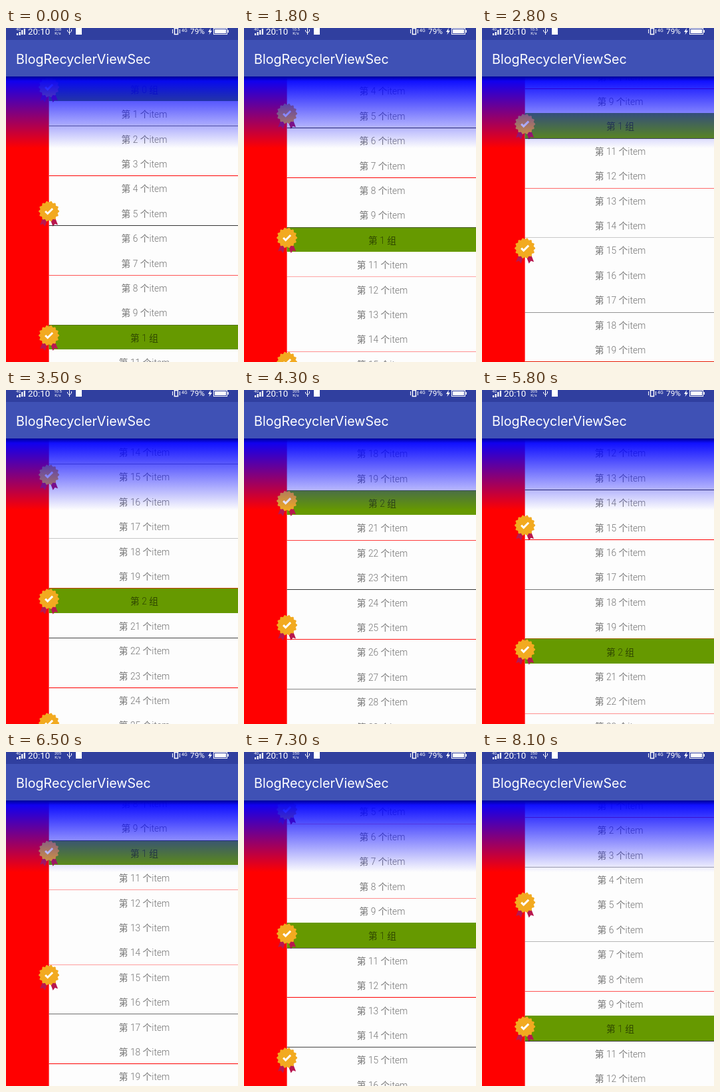
An HTML page with a canvas that plays this animation: 349x503 px, repeating every 8.5 s.

```html
<!DOCTYPE html>
<html lang="zh-CN">
<head>
<meta charset="utf-8">
<title>BlogRecyclerViewSec</title>
<style>
  html, body { margin: 0; width: 100%; height: 100%; overflow: hidden; background: #fdfdfd; }
  canvas { display: block; }
</style>
</head>
<body>
<canvas id="stage" width="349" height="503"></canvas>
<script>
const W = 349, H = 503, LOOP = 8500, STEP = 100;
const TOP = 73, SIDE = 64.6, ROW = 37.4;
const ctx = document.getElementById('stage').getContext('2d');

const SANS = 'Roboto, "Noto Sans CJK SC", "Noto Sans CJK", sans-serif';

// Scroll track: [time, offset, easing towards this key]
const easeIn = p => u => u ** p;
const easeOut = p => u => 1 - (1 - u) ** p;
const linear = u => u;
const track = [
  [0, 0, linear],
  [1200, 0, linear],
  [1800, 147.04, easeIn(1.3)],
  [2500, 300, easeOut(1.6)],
  [2700, 300, linear],
  [3500, 522.37, easeIn(1.2)],
  [4800, 695.5, easeOut(2)],
  [4900, 695.5, linear],
  [5000, 692.55, linear],
  [5800, 446.2, linear],
  [7300, 189.42, easeOut(1.15)],
  [8100, 49.39, easeOut(1.4)],
  [LOOP, 49.39, linear]
];

// Network speed shown in the status bar: [from, value]
const speeds = [[0, '328'], [1600, '10.5'], [4000, '205'], [7000, '250']];

function scrollAt(t) {
  const i = track.findIndex(k => k[0] > t);
  const [t0, a] = track[i - 1], [t1, b, ease] = track[i];
  return a + (b - a) * ease((t - t0) / (t1 - t0));
}

function rect(color, x, y, w, h) {
  ctx.fillStyle = color;
  ctx.fillRect(x, y, w, h);
}

function text(str, x, y, size, { color = '#fff', align = 'left', font = SANS, weight = 400 } = {}) {
  ctx.font = `${weight} ${size}px ${font}`;
  ctx.textAlign = align;
  ctx.textBaseline = 'alphabetic';
  ctx.fillStyle = color;
  ctx.fillText(str, x, y);
}

function poly(color, points) {
  ctx.beginPath();
  points.forEach(([x, y]) => ctx.lineTo(x, y));
  ctx.closePath();
  ctx.fillStyle = color;
  ctx.fill();
}

function stroke(color, width, points) {
  ctx.beginPath();
  points.forEach(([x, y]) => ctx.lineTo(x, y));
  ctx.strokeStyle = color;
  ctx.lineWidth = width;
  ctx.stroke();
}

function medal(cx, cy) {
  ctx.save();
  ctx.translate(cx, cy);
  const ribbon = [[1.5, 11], [9, 9], [13.5, 20.5], [9, 19], [6, 23]];
  poly('#b8174f', ribbon);
  poly('#b8174f', ribbon.map(([x, y]) => [-x, y]));
  const rim = [];
  for (let i = 0; i < 96; i++) {
    const a = i / 96 * Math.PI * 2;
    const r = 14.5 + 1.1 * Math.cos(a * 14);
    rim.push([r * Math.cos(a), r * Math.sin(a)]);
  }
  poly('#f2aa20', rim);
  stroke('#fff', 3, [[-5.5, 0], [-2, 3.5], [5.5, -4]]);
  ctx.restore();
}

// Top edge of a row, snapped to whole pixels
const rowTop = (n, scroll) => Math.floor(TOP + n * ROW - scroll + 0.15);

// Hairline dividers are thinner than a pixel, so only some survive scaling.
function divider(n, scroll) {
  const phase = (n * 0.27 + 0.4 - scroll) * 2;
  const nearest = Math.round(phase);
  const miss = Math.abs(phase - nearest) / 2;
  if (miss > 0.112) return;
  ctx.globalAlpha = Math.min(1, 1.15 - miss * 8);
  rect(nearest & 1 ? '#f00' : '#333', SIDE, rowTop(n, scroll), W - SIDE, 1);
  ctx.globalAlpha = 1;
}

function list(scroll) {
  rect('#fdfdfd', 0, TOP, W, H - TOP);
  rect('#f00', 0, TOP, SIDE, H - TOP);
  const first = Math.max(0, Math.floor(scroll / ROW) - 1);
  const last = Math.ceil((scroll + H - TOP) / ROW) + 1;

  for (let i = first; i <= last; i++) {
    const y = rowTop(i, scroll);
    const group = i % 10 === 0;
    if (group) rect('#690', SIDE, y, W - SIDE, rowTop(i + 1, scroll) - y);
    text(group ? `第 ${i / 10} 组` : `第 ${i} 个item`, 208, Math.round(TOP + i * ROW - scroll + 24.8), 13.8,
      { color: 'rgba(0,0,0,.54)', align: 'center', weight: 300 });
  }
  for (let i = first; i <= last; i++) {
    divider(i, scroll);
    if (i % 5 === 0) medal(SIDE, TOP + (i + 0.5) * ROW - scroll - 2.7);
  }

  const fade = ctx.createLinearGradient(0, TOP, 0, 181);
  fade.addColorStop(0, 'rgb(0,0,255)');
  fade.addColorStop(1, 'rgba(0,0,255,0)');
  rect(fade, 0, TOP, W, 108);

  const shade = ctx.createLinearGradient(0, TOP, 0, TOP + 7);
  shade.addColorStop(0, 'rgba(0,0,0,.4)');
  shade.addColorStop(1, 'rgba(0,0,0,0)');
  rect(shade, 0, TOP, W, 7);
}

function statusBar(t) {
  rect('#303f9f', 0, 0, W, 18);
  text('4G', 15, 4, 6);
  [3, 5, 7, 9].forEach((h, i) => rect('#fff', 16 + i * 3.6, 10 - h + (i < 2 ? 1 : 0), 2.2, h));
  text('20:10', 33, 10, 13.4);
  const speed = speeds.filter(s => s[0] <= t).pop()[1];
  text(speed, 78, 4, 6, { align: 'center' });
  text('K/s', 78, 10, 6, { align: 'center' });

  stroke('#fff', 1, [[95.5, 0], [95.5, 10]]);
  stroke('#fff', 1, [[92.5, 3], [92.5, 5], [95.5, 7.5], [98.5, 5], [98.5, 2]]);
  rect('#fff', 105, 0, 9, 10);

  ctx.strokeStyle = '#fff';
  ctx.lineWidth = 1.5;
  ctx.strokeRect(253.5, 0.5, 5, 9);
  stroke('#fff', 1, [[250.5, 2], [250.5, 8]]);
  stroke('#fff', 1, [[261.5, 2], [261.5, 8]]);
  text('4G', 264, 6, 7);
  text('79%', 277, 9, 11.8);
  poly('#fff', [[308, 0], [304, 6], [306.5, 6], [305.5, 10], [310, 4], [307.3, 4]]);
  ctx.strokeRect(312.5, 0.5, 20, 9);
  rect('#fff', 314, 2, 17, 6);
  rect('#fff', 333.5, 3, 1.5, 4);
}

function draw(now) {
  const t = Math.floor(now % LOOP / STEP) * STEP;
  list(scrollAt(t));
  rect('#3f51b5', 0, 18, W, TOP - 18);
  text('BlogRecyclerViewSec', 15, 54, 19.7, { font: 'Inter, Roboto, sans-serif' });
  statusBar(t);
}

let start;
function tick(now) {
  start ??= now;
  draw(now - start);
  requestAnimationFrame(tick);
}
draw(0);
requestAnimationFrame(tick);
</script>
</body>
</html>
```
